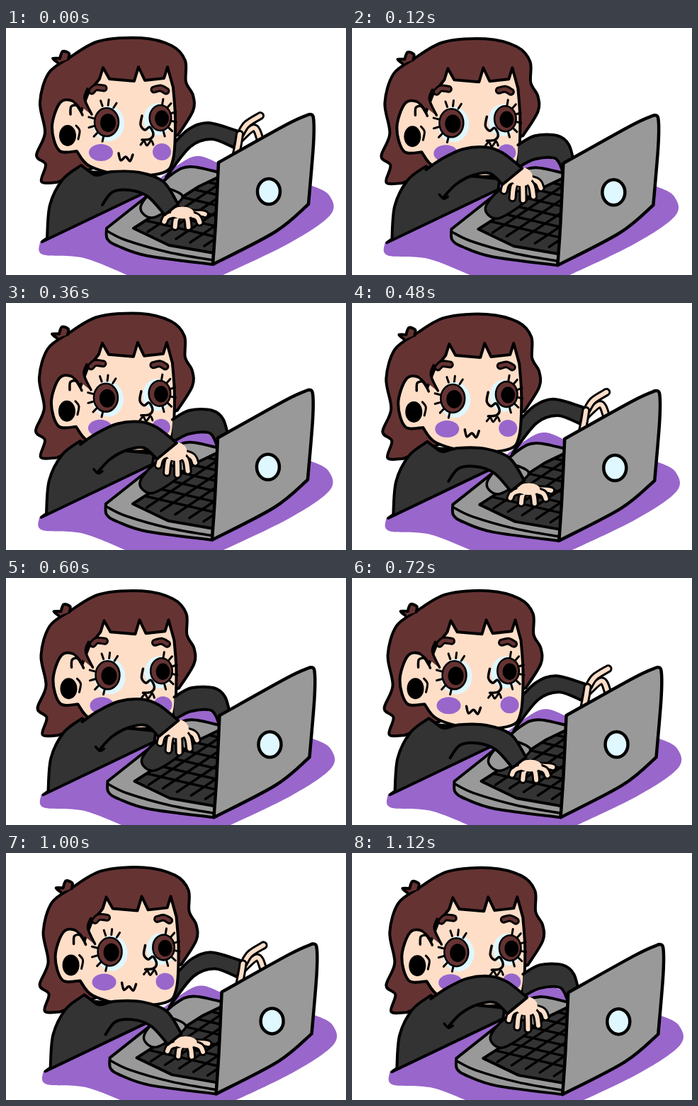
Recreate the animation shown at these times as an HTML page with a canvas. Size 480 px wide and 349 px high, loop 1200 ms.

```html
<!DOCTYPE html>
<html lang="en">
<head>
<meta charset="utf-8">
<title>Typing at a laptop</title>
<style>
html, body { margin: 0; width: 100%; height: 100%; overflow: hidden; background: #fff; }
canvas { display: block; }
</style>
</head>
<body>
<canvas width="480" height="349"></canvas>
<script>
const ctx = document.querySelector('canvas').getContext('2d');
const HAIR = '#663333', SKIN = '#ffdec8', DARK = '#333', GREY = '#999', PURPLE = '#9966cc', PALE = '#dff8ff';
const { sin, cos, exp, floor, max, min } = Math;

// Smooth curve through "x,y" points; a point ending in ! is a sharp corner.
function trace(text, closed) {
  const pts = text.split(' ').flatMap(s => {
    const p = s.replace('!', '').split(',').map(Number);
    return s.endsWith('!') ? [p, p] : [p];
  });
  const n = pts.length;
  const at = i => pts[closed ? (i + n) % n : max(0, min(n - 1, i))];
  ctx.beginPath();
  ctx.moveTo(...pts[0]);
  for (let i = 0; i < (closed ? n : n - 1); i++) {
    const [a, b, c, d] = [at(i - 1), at(i), at(i + 1), at(i + 2)];
    if (b === c) continue;
    ctx.bezierCurveTo(b[0] + (c[0] - a[0]) / 6, b[1] + (c[1] - a[1]) / 6,
      c[0] - (d[0] - b[0]) / 6, c[1] - (d[1] - b[1]) / 6, ...c);
  }
}

function paint(fill, width) {
  if (fill) { ctx.fillStyle = fill; ctx.fill(); }
  if (width) { ctx.lineWidth = width; ctx.stroke(); }
}

function shape(text, fill, width = 4) { trace(text, true); paint(fill, width); }

function line(text, width = 3.5, fill) { trace(text, false); paint(fill, width); }

// Outlined stroke, for fingers and brows
function tube(text, fill, width = 6) {
  line(text, width + 6);
  ctx.strokeStyle = fill;
  line(text, width);
  ctx.strokeStyle = '#000';
}

function oval(x, y, rx, ry, fill, width = 0) {
  ctx.beginPath();
  ctx.ellipse(x, y, rx, ry, 0, 0, 7);
  paint(fill, width);
}

function table() {
  shape('48,302! 190,234! 245,192 272,181 302,192! 430,222! 456,236 458,264 400,304 300,352! 178,352! 110,325 52,320', PURPLE, 0);
}

function hair() {
  shape('88,43! 130,19 190,14 234,25 253,46 254,76 264,95 264,117 243,151! 130,195! 72,218! 50,217 56,193 43,180 55,148 48,105 60,64', HAIR);
  line('73,49 66,43 76,43! 80,33 89,36 88,44', 4, HAIR);
}

function body() {
  shape('51,302! 58,297! 62,250 80,214 106,194! 118,203! 150,206! 210,212! 208,227!', DARK);
}

// Lashes are short rays between two angles, spaced evenly.
function lashes(x, y, rx, ry, from, to, count) {
  for (let i = 0; i < count; i++) {
    const a = from + (to - from) * i / (count - 1), u = cos(a), v = sin(a);
    line(`${x + rx * u},${y + ry * v} ${x + (rx + 8) * u},${y + (ry + 8) * v}`, 3);
  }
}

function eye(x, y, k, gaze) {
  oval(x + gaze, y + 2, 22 * k, 25 * k, PALE);
  oval(x, y, 17 * k, 20 * k, HAIR, 2.5);
  oval(x + 2, y + 1, 11 * k, 13 * k, '#000');
}

function head() {
  shape('116,92! 132,72! 137,56! 146,72! 181,75! 187,55! 196,74! 223,71! 228,55! 236,84! 239,130 236,185 220,205 165,208 118,195 100,174! 75,173 65,140 76,106 94,103 106,118!', SKIN);
  shape('98,90! 118,78! 112,98 120,122! 94,101!', HAIR, 0);
  line('115,86 111,100 121,122');
  line('91,122 92,111 101,110 108,123');
  line('99,138 104,145 102,157', 3);
  oval(87, 152, 12, 15, '#000');

  eye(142, 133, 1, 3);
  eye(218, 127, .9, -4);
  lashes(142, 133, 18, 24, -1.9, -1, 3);
  lashes(142, 133, 18, 20, 1.8, 3.4, 4);
  lashes(218, 127, 15, 19, -1.4, 1.3, 6);
  tube('121,89 127,84 138,85', HAIR, 5);
  tube('209,87 218,85 226,89', HAIR, 5);

  line('192,124 190,137 196,144 203,140 208,150 203,157 192,158');
  line('190,165 195,160 199,166 205,159 208,165', 3);
  oval(134, 176, 17, 12, PURPLE);
  oval(220, 175, 13, 12, PURPLE);
  line('159,177 162,187 169,182 175,188 179,179');
}

function laptopBase(padColour) {
  shape('142,283! 200,237! 235,206 260,196 301,204! 292,334! 200,322 158,308 143,298', GREY);
  line('143,287 170,300 230,317 292,328');

  ctx.save();
  trace('180,283! 272,224! 299,211! 299,319! 230,307!', true);
  paint(DARK, 4);
  ctx.clip();
  for (let i = 1; i < 8; i++) {
    line(`${180 + i * 17},${283 - i * 11} ${305 + i * 17},${312 - i * 11}`);
    line(`${180 + i * 20},${283 + i * 5} ${300 + i * 20},${203 + i * 5}`);
  }
  ctx.restore();
  shape('190,253 214,226 246,234 244,246 207,268', padColour, 3.5);
}

function laptopLid() {
  shape('300,190! 395,137 428,122! 434,127 434,165 427,249! 380,288 292,334! 296,275', GREY, 4.5);
  oval(371, 231, 16, 18, PALE, 4.5);
}

// Five fingers fan out on an ellipse around the palm.
function hand(x, y, rx, ry, from, to) {
  for (let i = 0; i < 5; i++) {
    const a = from + (to - from) * i / 4, u = rx * cos(a), v = ry * sin(a);
    tube(`${x},${y} ${x + u * .8},${y + v * .4} ${x + u},${y + v}`, SKIN);
  }
  oval(x, y, rx * .5, ry * .4, SKIN);
}

function raisedArm() {
  line('236,164 258,143 286,134 328,146! 322,169! 290,157 260,168 226,211', 4, DARK);
  tube('329,158 350,141 359,158', SKIN);
  tube('331,150 340,136 359,124', SKIN);
  tube('330,150 328,163 325,178', SKIN);
}

function typingArm() {
  hand(249, 261, 32, 21, .1, 2.5);
  line('118,203 128,208 150,203 188,204 222,217 243,249! 224,264! 200,238 174,229 150,232 136,250', 4, DARK);
}

function crossedArm() {
  line('236,164 260,151 292,151 308,164 316,194! 302,212! 290,184 260,184 236,196', 4, DARK);
}

function foldedArm() {
  hand(241, 209, 31, 33, .5, 2.5);
  line('106,199 128,184 158,170 190,167 214,175 242,197! 214,220! 196,204 172,207 148,220 131,238', 4, DARK);
  line('125,234 131,240 137,237');
}

function draw(step) {
  const folded = step % 4 === 1 || step % 4 === 2;
  ctx.setTransform(1, 0, 0, 1, 0, 0);
  ctx.clearRect(0, 0, 480, 349);
  // Hand-held drift: an early dip to the left, then down and right
  ctx.translate(.3 * step - step * exp(1 - step / 3), .35 * step + 1.2 * sin(.83 * step));
  ctx.lineCap = ctx.lineJoin = 'round';
  ctx.strokeStyle = '#000';
  table();
  if (!folded) raisedArm();
  hair();
  head();
  body();
  laptopBase(folded ? DARK : GREY);
  if (folded) crossedArm();
  laptopLid();
  (folded ? foldedArm : typingArm)();
}

// Each 120 ms beat holds one drawing for 40 ms and the next for 80 ms.
function tick() {
  const t = performance.now() % 1200;
  draw(max(0, 2 * floor(t / 120) - (t % 120 < 40 ? 1 : 0)));
  requestAnimationFrame(tick);
}
tick();
</script>
</body>
</html>
```
